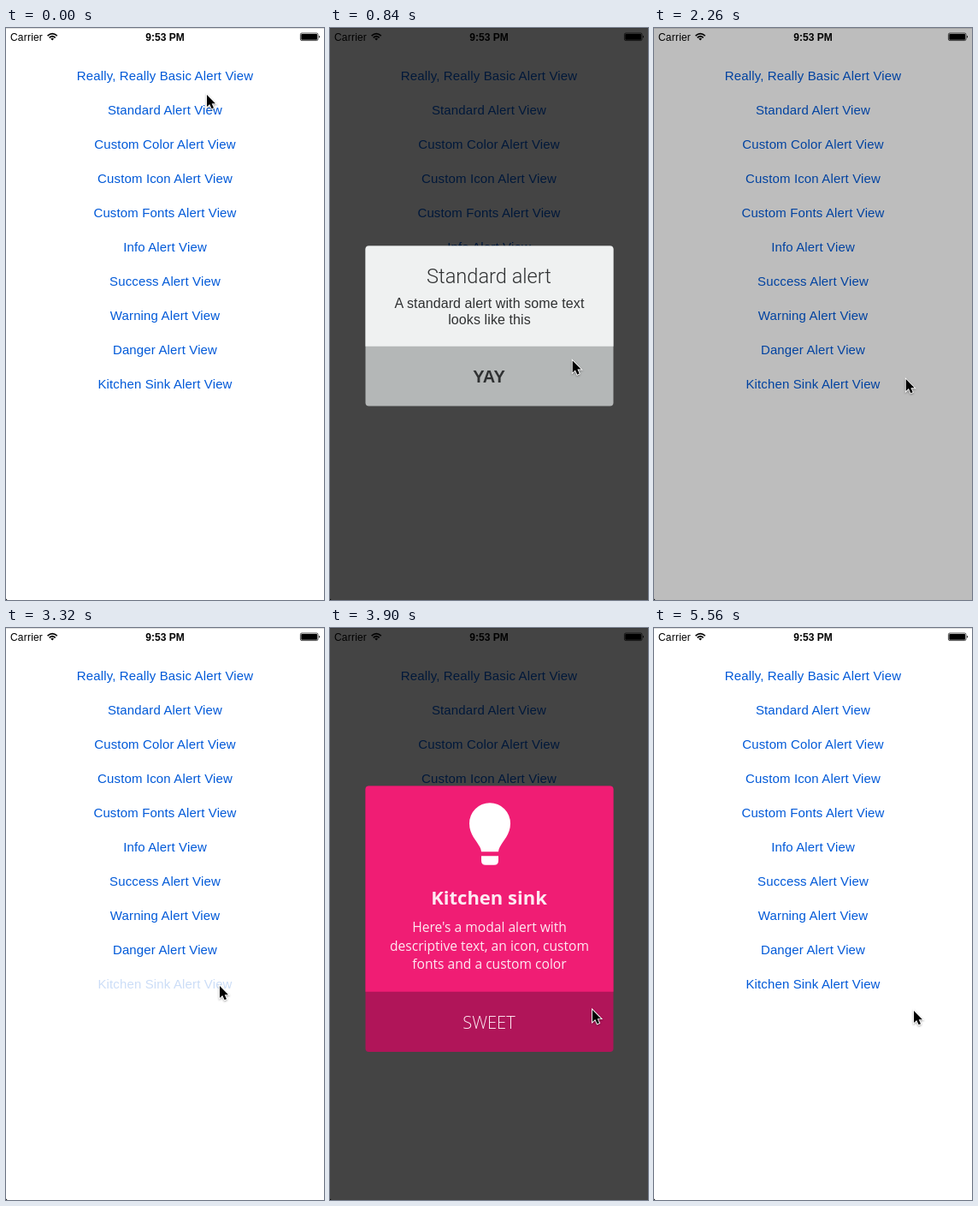
Write an HTML page that moves like this. It is 372 px wide and 668 px high and loops after 5580 ms.

```html
<!DOCTYPE html>
<html lang="en">
<head>
<meta charset="utf-8">
<title>Alert views</title>
<style>
  html, body { margin: 0; width: 100%; height: 100%; overflow: hidden; background: #fff; }
  svg { display: block; width: 372px; height: 668px; }
  text { font-family: "Liberation Sans", Arial, sans-serif; white-space: pre; }
  .mid { text-anchor: middle; }
  .bar { font-size: 12px; }
  #links { font-size: 15px; letter-spacing: .14px; fill: #0059d8; }
  #standard { fill: #2f3132; }
  #standard .title { font: 300 23.6px Roboto, sans-serif; }
  #standard .body { font-size: 16px; letter-spacing: .1px; }
  #standard .button { font-size: 20px; font-weight: 700; }
  #sink { fill: #fdeaf2; }
  #sink text { font-family: "Open Sans", "Noto Sans", sans-serif; }
  #sink .title { font-size: 22px; font-weight: 700; }
  #sink .body { font-size: 15.6px; }
  #sink .button { font-size: 20px; font-weight: 300; }
  #cursor { filter: drop-shadow(0 1px 1px rgba(0, 0, 0, .35)); }
</style>
</head>
<body>
<svg viewBox="0 0 372 668">
  <rect width="372" height="668" fill="#fff"/>
  <rect width="372" height="1" fill="#dedede"/>
  <path d="M0 666.5L1.5 668H0Z"/>

  <g id="status">
    <text class="bar" x="5" y="14.5" letter-spacing=".2">Carrier</text>
    <g fill="none" stroke="#000" stroke-width="1.7">
      <path d="M48.6 9.1Q54.2 4.2 59.8 9.1"/>
      <path d="M50.7 11.3Q54.2 8.2 57.7 11.3"/>
    </g>
    <path d="M52.3 12.4Q54.2 11 56.1 12.4L54.2 14.5Z"/>
    <text class="bar mid" x="186" y="14.5" font-weight="700">9:53 PM</text>
    <rect x="344.4" y="6" width="20.6" height="8.6" rx="1.6" fill="none" stroke="#000" stroke-width=".7"/>
    <rect x="345.3" y="6.9" width="18.8" height="6.8" rx=".8"/>
    <path d="M366 8.8Q368 10.3 366 11.8Z"/>
  </g>

  <g id="links" class="mid"></g>
  <rect id="shade" width="372" height="668"/>

  <g id="standard" class="mid">
    <rect x="41.5" y="252.3" width="290" height="187" rx="4" fill="#b4b7b7"/>
    <path d="M41.5 369.5V256.3a4 4 0 0 1 4-4h282a4 4 0 0 1 4 4V369.5Z" fill="#eff1f1"/>
    <text class="title" x="186" y="296">Standard alert</text>
    <text class="body" x="186.5" y="325">A standard alert with some text</text>
    <text class="body" x="186.5" y="344">looks like this</text>
    <text class="button" x="186" y="412">YAY</text>
  </g>

  <g id="sink" class="mid">
    <rect x="41.5" y="182.3" width="290" height="310.5" rx="4" fill="#b01559"/>
    <path d="M41.5 422.5V186.3a4 4 0 0 1 4-4h282a4 4 0 0 1 4 4V422.5Z" fill="#f01d74"/>
    <g fill="#fff">
      <path d="M177 259C176 249 163 242 163 226A24 24 0 0 1 211 226C211 242 198 249 197 259Z"/>
      <path d="M177 264H197V269.5Q197 274.5 192 274.5H182Q177 274.5 177 269.5Z"/>
    </g>
    <text class="title" x="186" y="320.5">Kitchen sink</text>
    <text class="body" x="186.5" y="353">Here's a modal alert with</text>
    <text class="body" x="186.5" y="375">descriptive text, an icon, custom</text>
    <text class="body" x="186.5" y="396">fonts and a custom color</text>
    <text class="button" x="186" y="466">SWEET</text>
  </g>

  <path id="cursor" d="M0 0V14L3.2 11L5.6 16.3L8 15.2L5.7 10.2H10Z"
        stroke="#fff" stroke-width="1.8" paint-order="stroke"/>
</svg>
<script>
const LOOP = 5580, STEP = 20, SHADE = .733;
const $ = id => document.getElementById(id);

const names = ['Really, Really Basic', 'Standard', 'Custom Color', 'Custom Icon', 'Custom Fonts',
  'Info', 'Success', 'Warning', 'Danger', 'Kitchen Sink'];
const links = names.map((name, i) => {
  const el = document.createElementNS('http://www.w3.org/2000/svg', 'text');
  el.setAttribute('x', 186);
  el.setAttribute('y', 61 + 40 * i);
  el.textContent = name + ' Alert View';
  $('links').append(el);
  return el;
});

// press: finger down, open: finger up, close: button tapped, from: start offset above rest
const alerts = [
  { el: $('standard'), link: links[1], press: 240, open: 340, close: 1900, from: -846 },
  { el: $('sink'), link: links[9], press: 3220, open: 3400, close: 4785, from: -838 }
];

// time, x, y of the pointer tip
const path = [
  [0, 235, 78], [220, 222, 91], [540, 222, 91], [960, 299, 462], [1120, 301, 450],
  [1640, 295, 410], [2220, 295, 410], [2800, 272, 416], [3160, 250, 418], [3440, 250, 418],
  [3860, 307, 446], [4500, 307, 446], [4760, 304, 456], [5120, 304, 456], [5400, 304, 447], [LOOP, 304, 447]
];

const clamp = v => Math.min(1, Math.max(0, v));
const ease = v => { const p = clamp(v); return p * p * (3 - 2 * p); };

// damped spring from 0 to 1, settled after `span` seconds
function spring(t, span) {
  if (t <= 0) return 0;
  if (t >= span) return 1;
  const damp = .8, decay = 6.9 / span, wd = decay / damp * Math.sqrt(1 - damp * damp);
  return 1 - Math.exp(-decay * t) * (Math.cos(wd * t) + (decay - .5) / wd * Math.sin(wd * t));
}

function pointer(t) {
  const i = path.findIndex(k => k[0] > t);
  const a = path[i - 1], b = path[i];
  const p = ease((t - a[0]) / (b[0] - a[0]));
  return [a[1] + (b[1] - a[1]) * p, a[2] + (b[2] - a[2]) * p];
}

function draw(t) {
  let shade = 0;
  for (const a of alerts) {
    const fade = ease((t - a.open) / 200) - ease((t - a.close - 300) / 100);
    const enter = spring((t - a.open - 50) / 1000, .5);
    const leave = spring((t - a.close) / 1000, .3);
    const y = a.from * (1 - enter) + 668 * leave;
    a.el.setAttribute('transform', `translate(0 ${y.toFixed(2)})`);
    a.el.setAttribute('opacity', fade);
    a.link.setAttribute('opacity', t < a.press ? 1 : .2 + .8 * clamp((t - a.open) / 250));
    shade += fade;
  }
  $('shade').setAttribute('opacity', SHADE * shade);
  const [x, y] = pointer(t);
  $('cursor').setAttribute('transform', `translate(${x.toFixed(1)} ${y.toFixed(1)})`);
}

const start = performance.now();
function tick() {
  const t = (performance.now() - start) % LOOP;
  draw(Math.floor(t / STEP) * STEP);
  requestAnimationFrame(tick);
}
tick();
</script>
</body>
</html>
```
